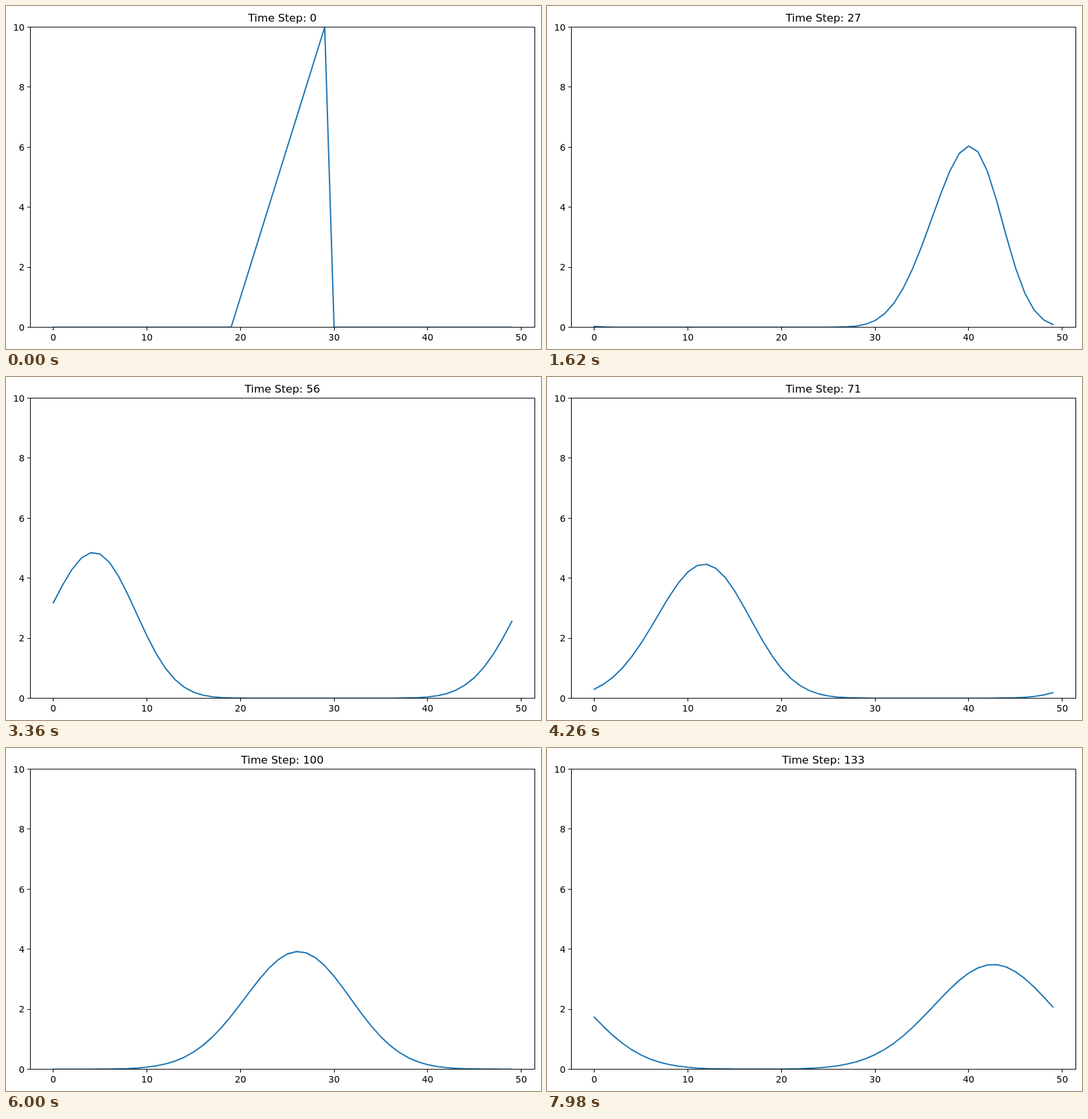
Animation of 822 by 528 pixels, one loop 8 s. Source, as an HTML page:

```html
<!DOCTYPE html>
<html lang="en">
<head>
<meta charset="utf-8">
<title>Upwind advection</title>
<style>
  html, body { margin: 0; width: 100%; height: 100%; overflow: hidden; background: #fff; }
  svg { display: block; width: 822px; height: 528px; }
  text { font-family: "DejaVu Sans", sans-serif; font-size: 13.89px; fill: #000; }
  #title { font-size: 16.67px; text-anchor: middle; }
  #curve { fill: none; stroke: #1f77b4; stroke-width: 2.083; stroke-linejoin: round; stroke-linecap: square; }
  #axes { fill: none; stroke: #000; stroke-width: 1.1; }
</style>
</head>
<body>
<svg viewBox="0 0 822 528">
  <clipPath id="plot"><rect x="37.5" y="32.5" width="775" height="462"/></clipPath>
  <g clip-path="url(#plot)"><path id="curve"/></g>
  <path id="axes"/>
  <g id="labels"></g>
  <text id="title" x="424.7" y="24"></text>
</svg>
<script>
const LOOP = 8000, STEP = 60, CELLS = 50;
const box = { left: 37.5, top: 32.5, right: 812.5, bottom: 494.5 };
const unit = (box.right - box.left) / (49 * 1.1);
const px = x => box.left + (x + 2.45) * unit;
const py = y => box.bottom - y * (box.bottom - box.top) / 10;
const snap = v => Math.floor(v) + 0.5;
const $ = id => document.getElementById(id);

function label(text, x, y, anchor) {
  const el = document.createElementNS("http://www.w3.org/2000/svg", "text");
  el.setAttribute("x", x);
  el.setAttribute("y", y);
  el.setAttribute("text-anchor", anchor);
  el.textContent = text;
  $("labels").append(el);
}

function drawAxes() {
  let d = `M${box.left} ${box.top}H${box.right}V${box.bottom}H${box.left}Z`;
  for (let x = 0; x <= 50; x += 10) {
    d += `M${snap(px(x))} ${box.bottom}v4.9`;
    label(x, px(x), 515, "middle");
  }
  for (let y = 0; y <= 10; y += 2) {
    d += `M${box.left} ${snap(py(y))}h-4.9`;
    label(y, 28.6, Math.round(py(y) + 5.2), "end");
  }
  $("axes").setAttribute("d", d);
}

// Periodic upwind scheme with Courant number 0.5, starting from a ramp.
function solve() {
  const rows = [Array.from({ length: CELLS }, (_, i) => i > 19 && i < 30 ? i - 19 : 0)];
  while (rows.length * STEP < LOOP) {
    const u = rows[rows.length - 1];
    rows.push(u.map((v, i) => (v + u[(i + CELLS - 1) % CELLS]) / 2));
  }
  return rows;
}

const rows = solve();
let shown = -1;

function render(time) {
  const step = Math.floor((time % LOOP) / STEP);
  if (step === shown) return;
  shown = step;
  const points = rows[step].map((v, i) => `${px(i).toFixed(2)} ${py(v).toFixed(2)}`);
  $("curve").setAttribute("d", "M" + points.join("L"));
  $("title").textContent = `Time Step: ${step}`;
}

drawAxes();
render(0);
const start = performance.now();
function tick() {
  render(performance.now() - start);
  requestAnimationFrame(tick);
}
requestAnimationFrame(tick);
</script>
</body>
</html>
```
